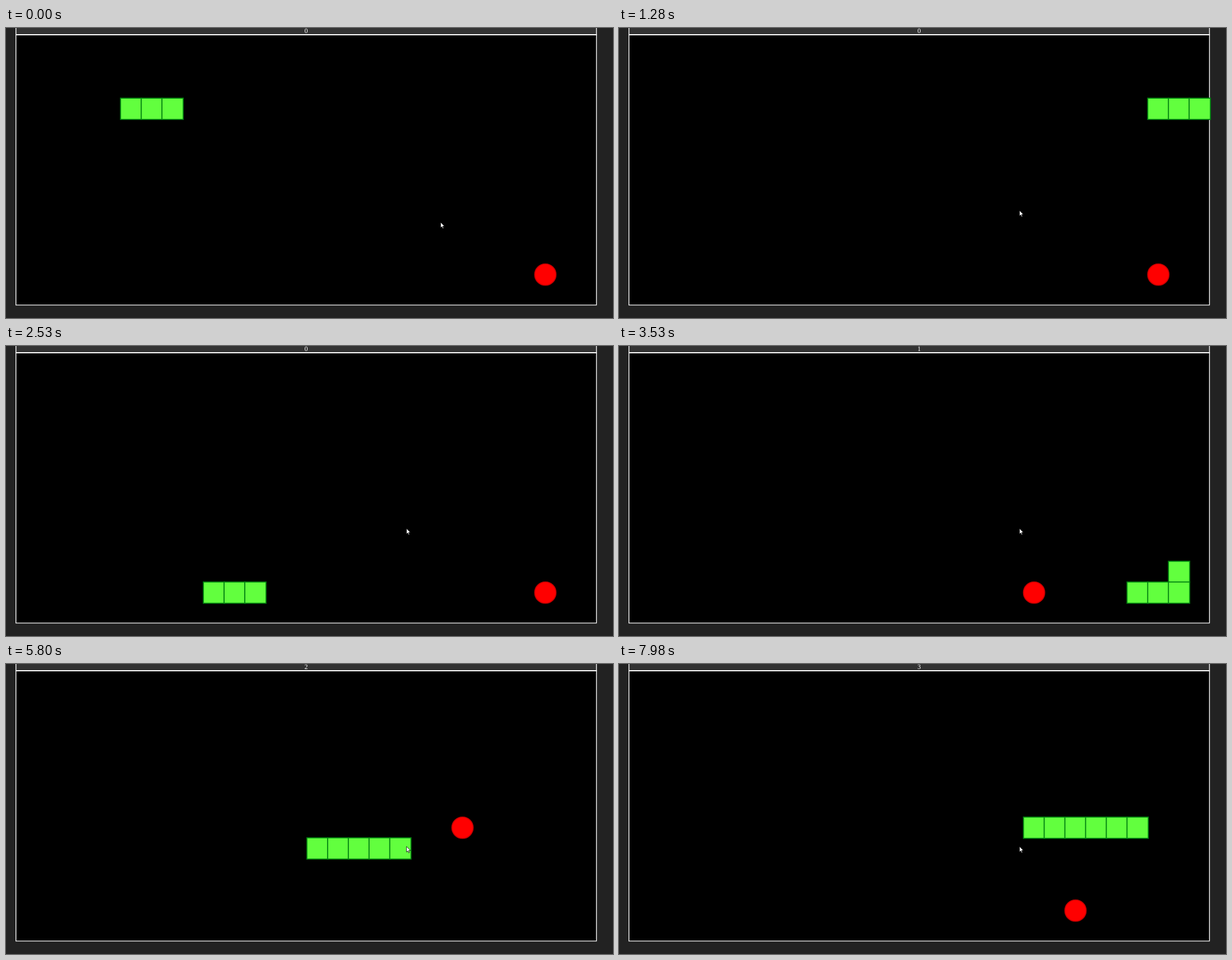
These frames come from a looping animation (1083x517 px, 8 s). An HTML page:

```html
<!DOCTYPE html>
<html lang="en">
<head>
<meta charset="utf-8">
<title>Snake</title>
<style>
  html, body { margin: 0; width: 100%; height: 100%; overflow: hidden; background: #222; }
  svg { display: block; width: 100%; height: 100%; }
  text { font: 12px "Liberation Serif", "Times New Roman", serif; fill: #fff; text-anchor: middle; }
  #snake rect { fill: #62ff3e; stroke: #008010; stroke-width: 1.85; }
</style>
</head>
<body>
<svg viewBox="0 0 1083 517">
  <rect width="1083" height="517" fill="#222"/>
  <rect x="17.7" y="-5" width="1036" height="17" fill="#333"/>
  <rect x="17.7" y="12" width="1036" height="482" fill="#000"/>
  <path d="M17.7 0V494M1053.5 0V494M17 493.9H1054.2" fill="none" stroke="#fff" stroke-width="1.4"/>
  <path d="M17 12.1H1054.2" stroke="#fff" stroke-width="2"/>
  <text id="score" x="535.5" y="9">0</text>
  <circle id="apple" r="19" fill="#f00" stroke="#c80000" stroke-width="1.85"/>
  <g id="snake"></g>
  <path id="cursor" d="M0 0V10L2.3 7.9L3.9 11.4L5.4 10.7L3.9 7.3H7.1Z" fill="#fff" stroke="#000" stroke-width=".8"/>
</svg>
<script>
const LOOP = 8000, CELL = 36.95, LEFT = 18.65, TOP = 13.3, COLS = 28;
const BLOCK = 39.8, BORDER = 1.85, START_LENGTH = 3;
const MOVE_MS = 62.8, MOVE_PHASE = 0.3;
const DIRS = { R: [1, 0], L: [-1, 0], U: [0, -1], D: [0, 1] };
const ROUTE = "R23 D8 R24 U6 L6 D6 L9 U3 R12 U3 L12 D2 R13";
const APPLES = [[25, 11], [19, 11], [21, 7], [21, 11]];

// The screen redraws slower than the snake moves: [redraw count, ms], even in between.
const PACE = [[0, 0], [17, 1280], [22, 1680], [59, 4540], [75, 5800], [90, 6980], [103, 7980]];
const PACE_SLACK = 5;

const $ = id => document.getElementById(id);
const snake = $("snake"), apple = $("apple"), score = $("score"), cursor = $("cursor");

// Play the route once, noting the score after every move.
const trail = Array.from({ length: START_LENGTH }, (_, i) => [5 + i, 3]);
const scores = [0];
for (const leg of ROUTE.split(" ")) {
  const [dx, dy] = DIRS[leg[0]];
  for (let n = +leg.slice(1); n > 0; n--) {
    const [x, y] = trail.at(-1);
    const head = [(x + dx + COLS) % COLS, y + dy];
    const eaten = scores.at(-1);
    trail.push(head);
    scores.push(eaten + (String(head) === String(APPLES[eaten]) ? 1 : 0));
  }
}

const blocks = Array.from({ length: START_LENGTH + scores.at(-1) }, () => {
  const block = document.createElementNS("http://www.w3.org/2000/svg", "rect");
  block.setAttribute("width", BLOCK - BORDER);
  block.setAttribute("height", BLOCK - BORDER);
  return snake.appendChild(block);
});

const place = (el, x, y) => el.setAttribute("transform", `translate(${x} ${y})`);
const placeInCell = (el, [col, row], inset) =>
  place(el, LEFT + col * CELL + inset, TOP + row * CELL + inset);

function lastRedraw(time) {
  const t = time + PACE_SLACK;
  const next = PACE.findIndex(([, ms]) => ms > t);
  if (next < 0) return PACE.at(-1)[1];
  const [k0, t0] = PACE[next - 1], [k1, t1] = PACE[next];
  const step = (t1 - t0) / (k1 - k0);
  return t0 + Math.floor((t - t0) / step) * step;
}

function render(time) {
  const t = lastRedraw(time);
  const moves = Math.min(Math.floor(t / MOVE_MS + MOVE_PHASE), scores.length - 1);
  const eaten = scores[moves];

  // Cells further right or down overlap their neighbours.
  const body = trail.slice(moves - eaten, moves + START_LENGTH)
    .sort((a, b) => a[1] - b[1] || a[0] - b[0]);
  blocks.forEach((block, i) => {
    block.style.display = body[i] ? "" : "none";
    if (body[i]) placeInCell(block, body[i], BORDER / 2);
  });

  placeInCell(apple, APPLES[eaten], BLOCK / 2);
  score.textContent = eaten;

  const p = Math.min(Math.max((t - 60) / 640, 0), 1);
  const ease = p * p * (3 - 2 * p);
  place(cursor, 775.4 - 60.8 * ease, 346.2 - 20.9 * ease);
}

const start = performance.now();
function tick() {
  render((performance.now() - start) % LOOP);
  requestAnimationFrame(tick);
}
tick();
</script>
</body>
</html>
```
